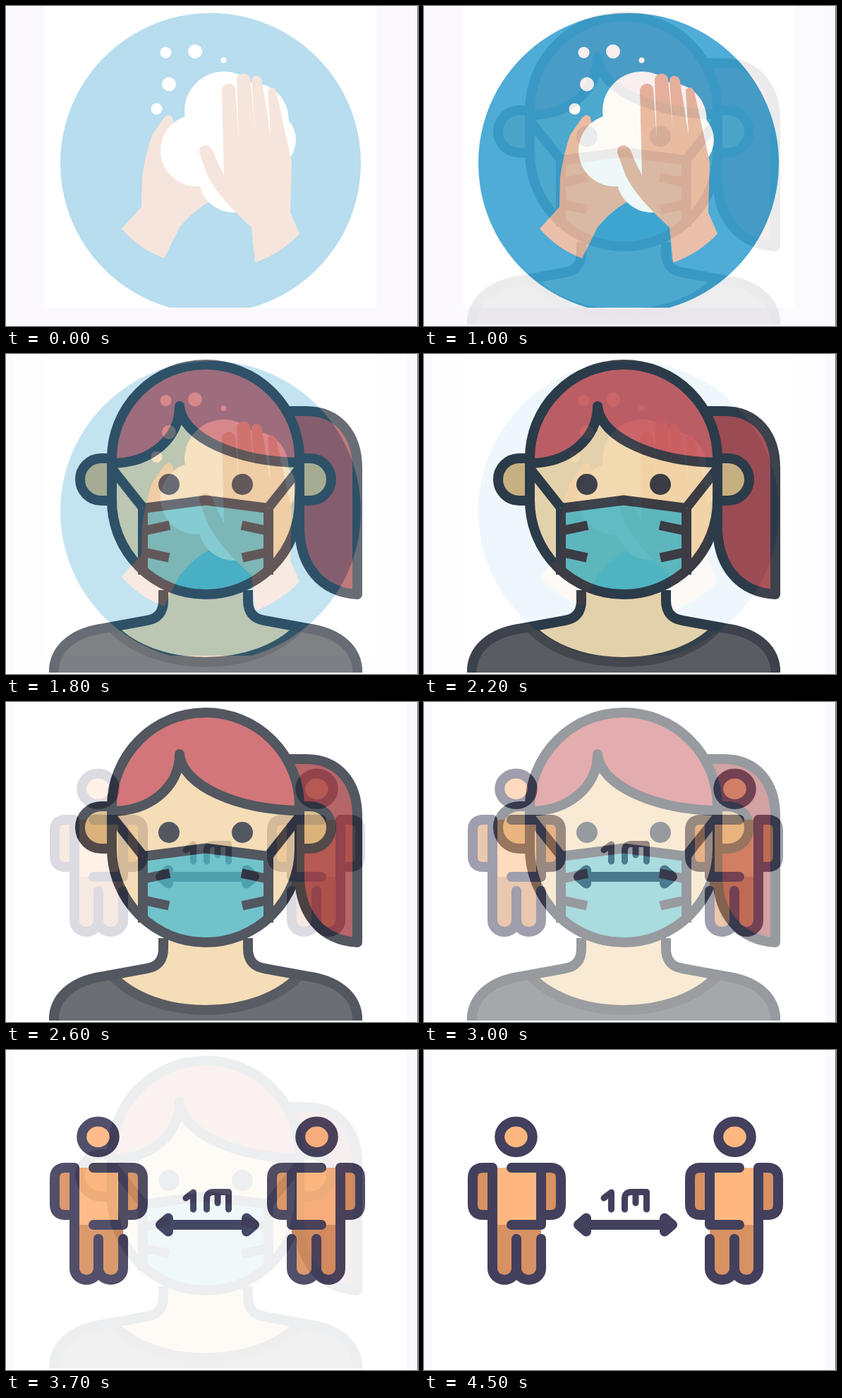
Write an HTML page that moves like this. It is 584 px wide and 454 px high and loops after 5000 ms.

```html
<!DOCTYPE html>
<html lang="en">
<head>
<meta charset="utf-8">
<title>Wash hands, wear a mask, keep distance</title>
<style>
  html, body { margin: 0; width: 100%; height: 100%; overflow: hidden; background: #fbf9fd; }
  svg { display: block; width: 100%; height: 100%; }
  .skin { fill: #e7b79e; }
  .foam { fill: #fff; }
  .ink { fill: none; stroke: #2c323d; stroke-width: 14; stroke-linejoin: round; }
  .navy { fill: none; stroke: #42405c; stroke-width: 14; stroke-linecap: round; stroke-linejoin: round; }
  .glyph { stroke-width: 9; }
</style>
</head>
<body>
<svg viewBox="0 0 584 454" role="img" aria-label="Wash hands, wear a mask, keep 1m distance">
  <defs>
    <clipPath id="card"><rect width="584" height="428"/></clipPath>
    <clipPath id="bust"><rect width="584" height="452"/></clipPath>

    <!-- pieces of the portrait that occur on both sides -->
    <g id="ear">
      <path fill="#d4b27a" d="M150 148H135a30 30 0 0 0 0 60H150z"/>
      <path class="ink" d="M150 148H135a30 30 0 0 0 0 60H150"/>
    </g>
    <g id="maskSide" class="ink">
      <path d="M152 165L194 218"/>
      <path d="M194 219V313"/>
      <path d="M199 250L232 243M199 282L231 289" stroke-width="13.5"/>
    </g>
    <path id="shoulder" class="ink" d="M223 335V350Q223 374 200 378L140 389C100 394 71 414 68 446V456"/>

    <g id="person">
      <path fill="#d79162" d="M69 167H97V234H84Q69 234 69 220zM166 167H184Q194 167 194 180V220Q194 234 180 234H166z"/>
      <path fill="#d79162" d="M97 246H166V312A17.5 14 0 0 1 131 312A17 14 0 0 1 97 312z"/>
      <path fill="#ffb780" d="M97 167H166V248H97z"/>
      <ellipse class="navy" cx="130.5" cy="123.3" rx="23.3" ry="21.7" style="fill:#ffb780" stroke-width="14.5"/>
      <path class="navy" d="M97 234H84Q69 234 69 219V182Q69 167 84 167H97V310A17 16 0 0 0 131 310V268"/>
      <path class="navy" d="M131 310A17.5 16 0 0 0 166 310V268"/>
      <path class="navy" d="M124 167H179Q194 167 194 182V219Q194 234 179 234H166"/>
      <path class="navy" d="M124 248H166V167"/>
    </g>
    <path id="head" class="navy" style="fill:#42405c" d="M219 248L230 238.5V257.5z"/>
  </defs>

  <rect width="584" height="454" fill="#fbf9fd"/>
  <rect x="54" width="471" height="428" fill="#fff"/>

  <g id="wash" clip-path="url(#card)">
    <circle cx="290" cy="223" r="213" fill="#34a0d1"/>
    <path class="skin" d="M164 316L192 285L193 243Q197 213 207 183L223 160Q230 151 236 158L238 170L300 200V270L288 278Q267 289 246 314L224 358Q188 344 164 316z"/>
    <g id="bubbles" class="foam"></g>
    <path class="skin" d="M353 364Q390 351 416 323L403 293L405 222L383 121Q378 111 371 119L375 183L363 107C361 97 349 96 348 106L353 178L346 103C344 93 328 94 327 104L330 190L325 117C322 107 307 108 306 120L309 240L297 216Q293 199 283 197.500Q273 198 274 208L286 241Q302 273 348 314z"/>
  </g>

  <g id="mask">
    <rect x="11" y="1" width="557" height="453" fill="#fff"/>
    <g clip-path="url(#bust)">
      <path fill="#a54448" d="M400 81H425C472 81 498 115 498 162V341C446 338 416 300 416 245z"/>
      <path class="ink" d="M400 81H425C472 81 498 115 498 162V341C446 338 416 300 416 245V200"/>
      <use href="#ear"/><use href="#ear" transform="matrix(-1 0 0 1 566 0)"/>
      <path fill="#f3d6a8" d="M223 330V350Q223 374 200 378L150 388Q210 437 283 437T416 388L366 378Q343 374 343 350V330z"/>
      <path fill="#4c4e54" d="M68 456C68 414 100 394 140 389L150 387C180 420 230 437 283 437S386 420 416 387L426 389C466 394 498 414 498 456z"/>
      <path class="ink" stroke-width="13" style="stroke:#34383f" d="M150 388C180 420 230 437 283 437S386 420 416 388"/>
      <use href="#shoulder"/><use href="#shoulder" transform="matrix(-1 0 0 1 566 0)"/>
      <path fill="#f3d6a8" d="M150 148A133 133 0 0 1 416 148V208A133 133 0 0 1 150 208z"/>
      <path fill="#c8585c" d="M150 155V148A133 133 0 0 1 416 148V154C330 153 250 120 246 76C246 120 205 155 150 155z"/>
      <path class="ink" d="M150 155C205 155 246 120 246 74C250 120 330 153 416 154"/>
      <path fill="#52b6c0" d="M194 219L283 207.500L372 219V307A133 133 0 0 1 194 307z"/>
      <use href="#maskSide"/><use href="#maskSide" transform="matrix(-1 0 0 1 566 0)"/>
      <path class="ink" d="M194 219L283 207.500L372 219"/>
      <path class="ink" d="M150 148A133 133 0 0 1 416 148V208A133 133 0 0 1 150 208z"/>
      <circle cx="231" cy="185" r="15" fill="#2c323d"/>
      <circle cx="335" cy="185" r="15" fill="#2c323d"/>
    </g>
  </g>

  <g id="distance">
    <rect x="11" y="1" width="557" height="453" fill="#fff"/>
    <use href="#person"/><use href="#person" transform="matrix(-1 0 0 1 571 0)"/>
    <path class="navy" d="M225 248H346"/>
    <use href="#head"/><use href="#head" transform="matrix(-1 0 0 1 571 0)"/>
    <path class="navy glyph" d="M255 210L265.500 202V226"/>
    <path class="navy glyph" d="M284.500 226V211Q284.500 201.500 294 201.500H315.500V226M300 202V217"/>
  </g>

  <rect x="583" width="1" height="454" fill="#6c6b70"/>
</svg>
<script>
  const LOOP = 5000, STEP = 100, FADE = 1600;

  // Each scene fades in over the one before; the first is already under way.
  const scenes = [['wash', -400], ['mask', 900], ['distance', 2400]]
    .map(([id, start]) => ({ node: document.getElementById(id), start }));

  const foam = [
    [226.5, 66, 8], [268, 64.5, 10], [308.5, 77, 4], [231, 111, 10], [213.5, 146, 8],
    [309, 149, 56], [270, 205, 51], [323, 243, 50], [350, 160, 50.5], [368, 190, 43]
  ];
  document.getElementById('bubbles').innerHTML =
    foam.map(([x, y, r]) => `<circle cx="${x}" cy="${y}" r="${r}"/>`).join('');

  const easeOut = x => 1 - Math.pow(1 - x, 1.5);
  const clamp = x => Math.min(1, Math.max(0, x));

  function draw(time) {
    const t = Math.floor((time % LOOP) / STEP) * STEP;
    for (const { node, start } of scenes) {
      node.setAttribute('opacity', easeOut(clamp((t - start) / FADE)).toFixed(3));
    }
  }

  const begin = performance.now();
  function tick() {
    draw(performance.now() - begin);
    requestAnimationFrame(tick);
  }
  tick();
</script>
</body>
</html>
```
